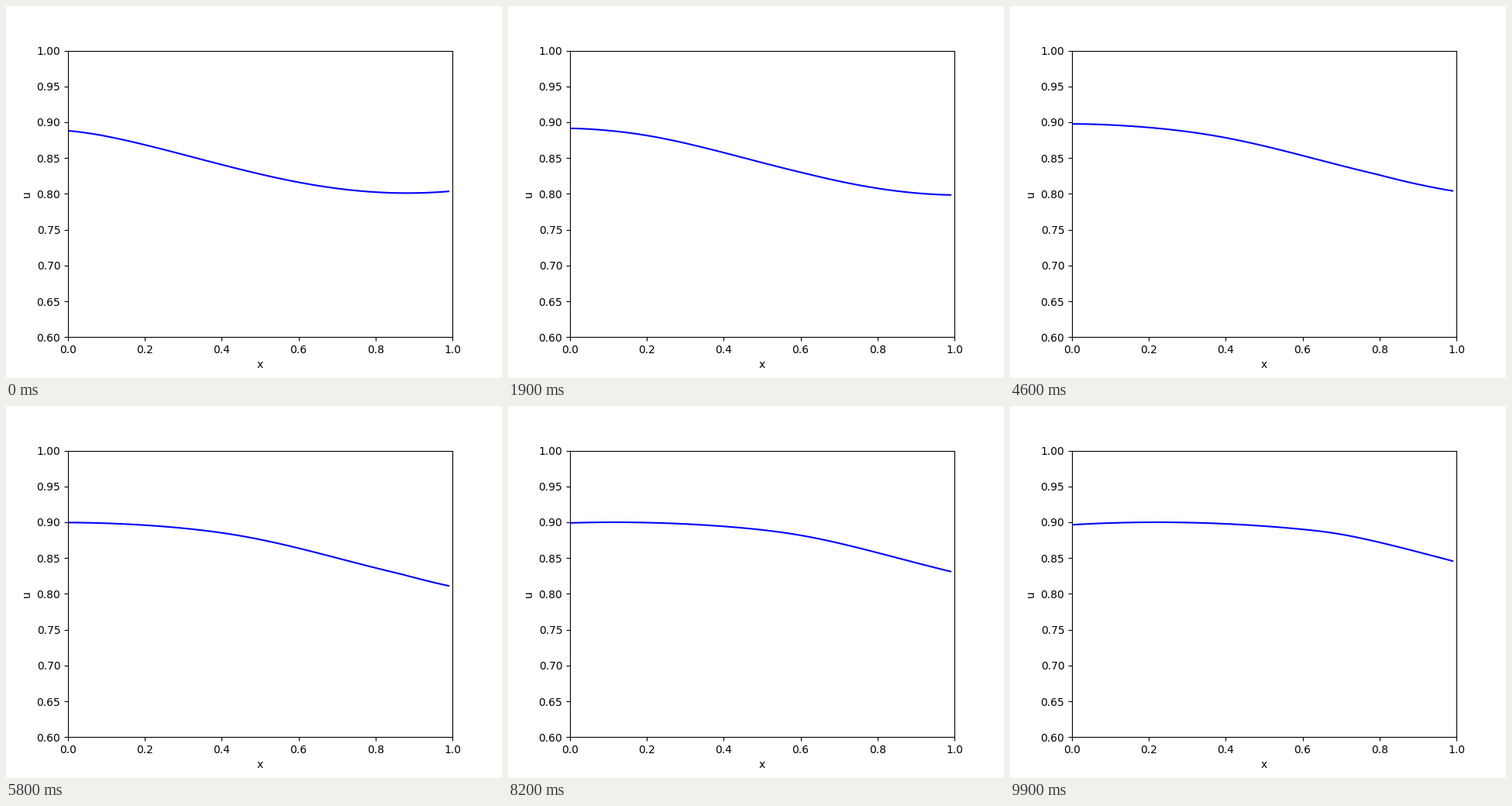
Write a matplotlib script that moves like this. It is 640 by 480 pixels and loops after 10000 ms.

```python
import numpy as np
import matplotlib.pyplot as plt
from matplotlib.animation import FuncAnimation

FRAMES, INTERVAL = 100, 100
LOOP = FRAMES * INTERVAL / 1000
SPEED = 0.0633
MEAN, AMP = 0.85055, 0.04945

x = np.arange(100) / 100


def softplus(s, width):
    return width * np.logaddexp(0, s / width)


def wave(t):
    """Cosine crest drifting right, with a shorter wavelength ahead of a bend."""
    s = x - SPEED * t
    bend = 0.028 + 0.05 * np.sin(np.pi * t / LOOP)
    phase = 0.687 + 1.7 * s + 1.15 * softplus(s - 0.05, bend)
    u = MEAN + AMP * np.cos(phase)
    # The trough deepens with time; the inflow edge dips briefly.
    trough = 0.0038 * t * np.maximum(s - 0.5, 0)
    dip = 0.0035 * np.exp(-((t - 2.8) / 1.9) ** 2 - x / 0.09)
    return u - trough - dip


fig, ax = plt.subplots(figsize=(6.4, 4.8), dpi=100)
ax.set(xlim=(0, 1), ylim=(0.6, 1), xlabel="x", ylabel="u")
line, = ax.plot(x, wave(0), "b-", lw=1.5)


def update(i):
    line.set_ydata(wave(i * INTERVAL / 1000))
    return line,


anim = FuncAnimation(fig, update, frames=FRAMES, interval=INTERVAL,
                     repeat=True, repeat_delay=0)
plt.show()
```
